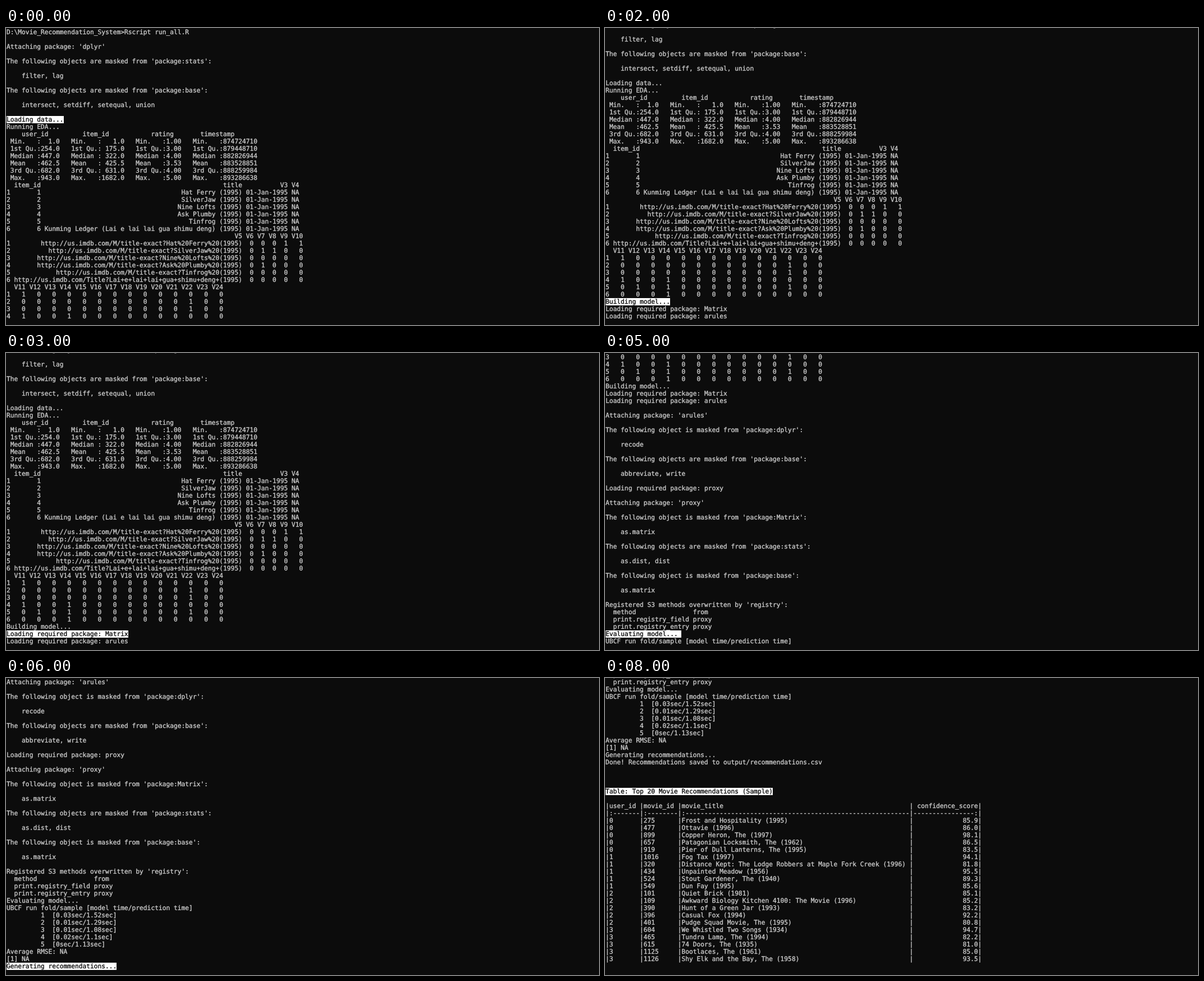
Write an HTML page that moves like this. It is 1057x530 px and loops after 9 s.

```html
<!DOCTYPE html>
<html lang="en">
<head>
<meta charset="utf-8">
<title>Terminal run</title>
<style>
  html, body { margin: 0; width: 100%; height: 100%; overflow: hidden; background: #0c0c0c; }
  #view { position: absolute; left: 0; top: 0; width: 1057px; height: 521px; overflow: hidden; }
  #log {
    position: absolute; left: 1px; top: 1px; color: #ccc; white-space: pre;
    font: 11.26px/13px "DejaVu Sans Mono", monospace;
    font-variant-ligatures: none; text-rendering: geometricPrecision;
    -webkit-text-stroke: 0.35px currentColor;
  }
  #log div { height: 13px; }
  #log span { display: inline-block; height: 13px; vertical-align: top; }
</style>
</head>
<body>
<div id="view"><div id="log"></div></div>
<script>
const ROW = 13, STEP_MS = 1000;

// One entry per second: [first visible row, highlighted row]
const steps = [
  [0, 12], [0, 13], [5, 42], [5, 43], [5, 44],
  [38, 76], [46, 85], [48, 86], [75, 90],
];

const right = (value, width) => String(value).padStart(width);
const attach = name => ["", `Attaching package: '${name}'`, ""];
const masked = (name, list, noun = "objects are") =>
  [`The following ${noun} masked from 'package:${name}':`, "", "    " + list, ""];
const need = name => `Loading required package: ${name}`;

const summary = [
  ["Min.   ", "  1.0", "   1.0", "1.00", "874724710"],
  ["1st Qu.", "254.0", " 175.0", "3.00", "879448710"],
  ["Median ", "447.0", " 322.0", "4.00", "882826944"],
  ["Mean   ", "462.5", " 425.5", "3.53", "883528851"],
  ["3rd Qu.", "682.0", " 631.0", "4.00", "888259984"],
  ["Max.   ", "943.0", "1682.0", "5.00", "893286638"],
].map(([label, ...values]) => " " + values.map(v => `${label}:${v}`).join("   "));

const pinyin = "Lai e lai lai gua shimu deng";
const films = ["Hat Ferry", "SilverJaw", "Nine Lofts", "Ask Plumby", "Tinfrog", `Kunming Ledger (${pinyin})`];
const filmRows = films.map((name, i) =>
  `${i + 1}${right(i + 1, 8)} ${right(name + " (1995)", 52)} 01-Jan-1995 NA`);

const site = "http://us.imdb.com/";
const link = (name, i) => i === 5
  ? `${site}Title?${pinyin.replaceAll(" ", "+")}+(1995)`
  : `${site}M/title-exact?${name.replaceAll(" ", "%20")}%20(1995)`;
const linkFlags = ["00011", "01100", "00000", "01000", "00000", "00000"];
const linkRows = films.map((name, i) =>
  (i + 1) + right(link(name, i), 61) + [...linkFlags[i]].map((v, k) => right(v, k < 4 ? 3 : 4)).join(""));

// Genre columns V11 to V24 that hold a 1
const genres = [[11], [22], [22], [11, 14], [12, 14, 22], [14]];
const columns = Array.from({ length: 14 }, (_, i) => 11 + i);
const genreRows = genres.map((set, i) =>
  (i + 1) + columns.map(c => right(set.includes(c) ? 1 : 0, 4)).join(""));

const picks = `275|Frost and Hospitality (1995)|85.9
477|Ottavie (1996)|86.0
899|Copper Heron, The (1997)|98.1
657|Patagonian Locksmith, The (1962)|86.5
919|Pier of Dull Lanterns, The (1995)|83.5
1016|Fog Tax (1997)|94.1
320|Distance Kept: The Lodge Robbers at Maple Fork Creek (1996)|81.8
434|Unpainted Meadow (1956)|95.5
524|Stout Gardener, The (1940)|89.3
549|Dun Fay (1995)|85.6
101|Quiet Brick (1981)|85.1
109|Awkward Biology Kitchen 4100: The Movie (1996)|85.2
390|Hunt of a Green Jar (1993)|83.2
396|Casual Fox (1994)|92.2
401|Pudge Squad Movie, The (1995)|80.8
604|We Whistled Two Songs (1934)|94.7
465|Tundra Lamp, The (1994)|82.2
615|74 Doors, The (1935)|81.0
1125|Bootlaces, The (1961)|85.0
1126|Shy Elk and the Bay, The (1958)|93.5`.split("\n").map(line => line.split("|"));

const tableRow = (user, id, title, score) =>
  `|${String(user).padEnd(8)}|${id.padEnd(9)}|${title.padEnd(60)}|${right(score, 17)}|`;
const rule = width => ":" + "-".repeat(width - 1);

const lines = [
  "D:\\Movie_Recommendation_System>Rscript run_all.R",
  ...attach("dplyr"),
  ...masked("stats", "filter, lag"),
  ...masked("base", "intersect, setdiff, setequal, union"),
  "Loading data...",
  "Running EDA...",
  right("user_id", 11) + right("item_id", 16) + right("rating", 17) + right("timestamp", 16),
  ...summary,
  "  item_id" + right("title", 53) + right("V3", 12) + " V4",
  ...filmRows,
  right("V5", 62) + " V6 V7 V8 V9 V10",
  ...linkRows,
  " " + columns.map(c => " V" + c).join(""),
  ...genreRows,
  "Building model...",
  need("Matrix"),
  need("arules"),
  ...attach("arules"),
  ...masked("dplyr", "recode", "object is"),
  ...masked("base", "abbreviate, write"),
  need("proxy"),
  ...attach("proxy"),
  ...masked("Matrix", "as.matrix", "object is"),
  ...masked("stats", "as.dist, dist"),
  ...masked("base", "as.matrix", "object is"),
  "Registered S3 methods overwritten by 'registry':",
  "  method               from",
  "  print.registry_field proxy",
  "  print.registry_entry proxy",
  "Evaluating model... ",
  "UBCF run fold/sample [model time/prediction time]",
  ...["0.03sec/1.52", "0.01sec/1.29", "0.01sec/1.08", "0.02sec/1.1", "0sec/1.13"]
    .map((time, i) => `${right(i + 1, 10)}  [${time}sec]`),
  "Average RMSE: NA",
  "[1] NA",
  "Generating recommendations...",
  "Done! Recommendations saved to output/recommendations.csv ",
  "", "", "",
  "Table: Top 20 Movie Recommendations (Sample)",
  "",
  tableRow("user_id", "movie_id", "movie_title", "confidence_score"),
  tableRow(rule(8), rule(9), rule(60), "-".repeat(16) + ":"),
  ...picks.map((pick, i) => tableRow(Math.floor(i / 5), ...pick)),
];

const log = document.getElementById("log");
const spans = lines.map(text => {
  const row = log.appendChild(document.createElement("div"));
  const span = row.appendChild(document.createElement("span"));
  span.textContent = text;
  return span;
});

// Plays one held style per step, forever
function play(element, styleAt) {
  const frames = steps.map((step, i) => ({
    ...styleAt(step), offset: i / steps.length, easing: "step-end",
  }));
  frames.push({ ...styleAt(steps.at(-1)), offset: 1 });
  const animation = element.animate(frames, { duration: steps.length * STEP_MS, iterations: Infinity });
  animation.startTime = document.timeline.currentTime;
}

play(log, ([top]) => ({ transform: `translateY(${-top * ROW}px)` }));
for (const [, marked] of steps) {
  play(spans[marked], ([, row]) => row === marked
    ? { color: "#0c0c0c", backgroundColor: "#fff" }
    : { color: "#ccc", backgroundColor: "transparent" });
}
</script>
</body>
</html>
```
